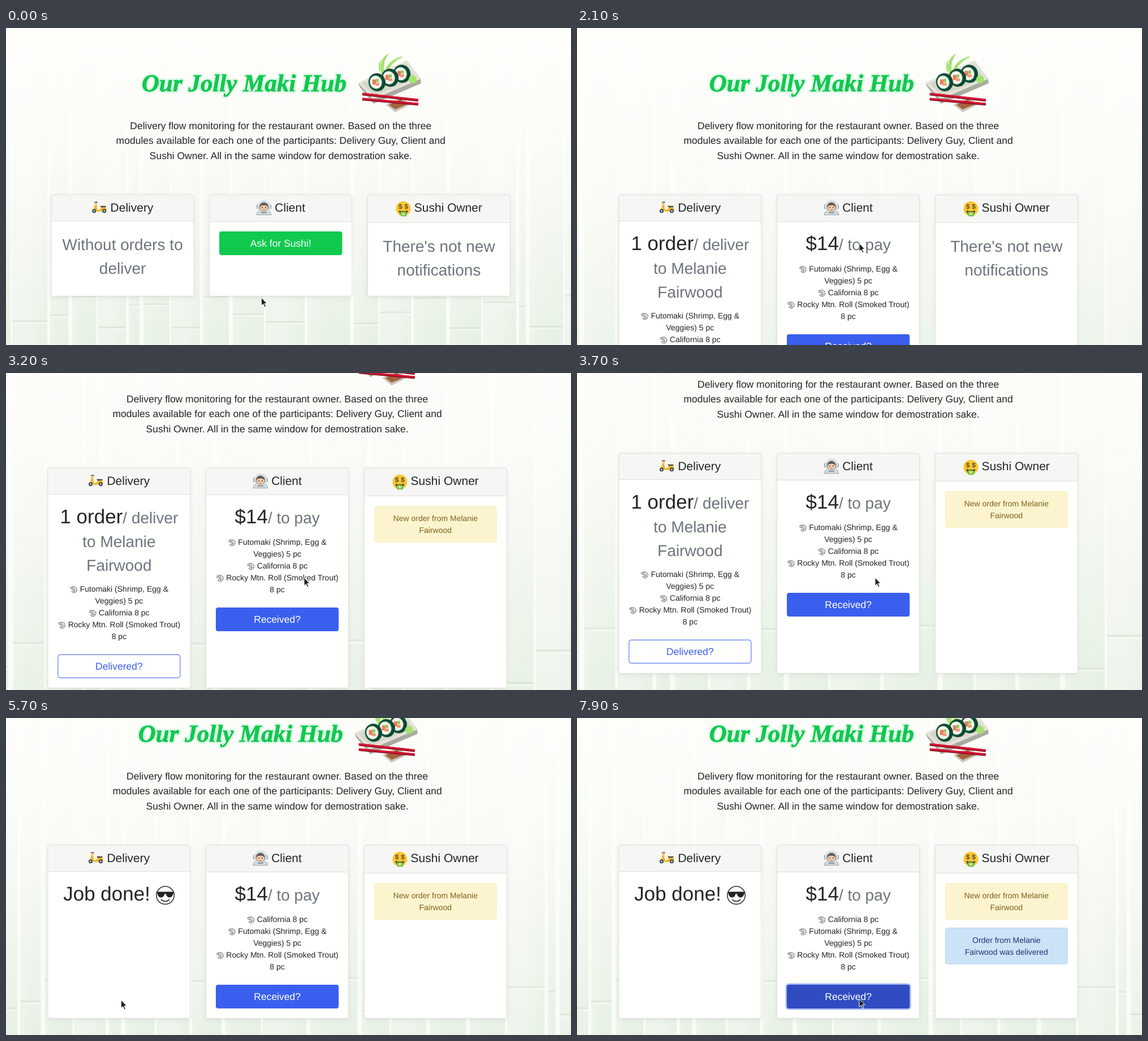
Write an HTML page with a canvas that moves like this. It is 999 by 561 pixels and loops after 8000 ms.

```html
<!DOCTYPE html>
<html lang="en">
<head>
<meta charset="utf-8">
<title>Sushi delivery</title>
<style>
  html, body { margin: 0; width: 100%; height: 100%; overflow: hidden; background: #fefefb; }
  canvas { display: block; }
</style>
</head>
<body>
<canvas id="stage" width="999" height="561"></canvas>
<script>
const ctx = document.getElementById('stage').getContext('2d');
ctx.textRendering = 'geometricPrecision';
const LOOP = 8000, STEP = 100, W = 999, H = 561;
const INK = '#212529', MUTED = '#6c757d', GREEN = '#10c94f', BLUE = '#3a5fee';
const SANS = '"Liberation Sans", Arial, sans-serif';
const CARD_LEFT = 79.6, CARD_PITCH = 279.7, CARD_WIDTH = 253;
const CUSTOMER = ['Melanie', 'Fairwood'];

// ---------- helpers ----------
const clamp = v => Math.max(0, Math.min(1, v));
const smooth = v => v * v * (3 - 2 * v);
const fade = (t, start) => clamp((t - start) / 200);

function track(t, keys, ease = v => v) {
  let [t0, v0] = keys[0];
  for (const [t1, v1] of keys) {
    if (t < t1) return v0 + (v1 - v0) * ease(clamp((t - t0) / (t1 - t0)));
    [t0, v0] = [t1, v1];
  }
  return v0;
}

function paint(d, fill, stroke, width = 1) {
  const path = new Path2D(d);
  if (fill) { ctx.fillStyle = fill; ctx.fill(path); }
  if (stroke) { ctx.strokeStyle = stroke; ctx.lineWidth = width; ctx.stroke(path); }
}

function disc(x, y, rx, fill, ry = rx, tilt = 0) {
  ctx.beginPath();
  ctx.ellipse(x, y, rx, ry, tilt, 0, 7);
  ctx.fillStyle = fill;
  ctx.fill();
}

function box(x, y, w, h, r, fill, stroke) {
  ctx.beginPath();
  ctx.roundRect(x, y, w, h, r);
  if (fill) { ctx.fillStyle = fill; ctx.fill(); }
  if (stroke) { ctx.strokeStyle = stroke; ctx.lineWidth = 1; ctx.stroke(); }
}

// Centres a run of [text or icon, size, colour] parts on one baseline.
function row(cx, y, ...parts) {
  const widths = parts.map(([item, size]) => {
    if (typeof item === 'function') return size;
    ctx.font = `${size}px ${SANS}`;
    return ctx.measureText(item).width;
  });
  let x = cx - widths.reduce((a, b) => a + b) / 2;
  parts.forEach(([item, size, color = INK], i) => {
    if (typeof item === 'function') {
      ctx.save();
      ctx.translate(x + size / 2, y - size * 0.27);
      ctx.scale(size / 27, size / 27);
      item();
      ctx.restore();
    } else {
      ctx.font = `${size}px ${SANS}`;
      ctx.fillStyle = color;
      ctx.fillText(item, x, y);
    }
    x += widths[i];
  });
}

// ---------- icons, drawn in a 27 unit square around the origin ----------
function scooter() {
  paint('M-9-9L-5-10L-4-8', null, '#4c565c', 1.6);
  paint('M-8-8L-5-8L-4 3Q0 5 2 2Q3-1 6-1H10Q13 1 13 5L5 7H-5L-10 3Z', '#f5b52e');
  paint('M1-3L11-3L12-1L3 0Z', '#5b4a42');
  disc(-8, -5, 1.6, '#ffe48c');
  for (const x of [-9.5, 8.5]) { disc(x, 6, 3.5, '#37474f'); disc(x, 6, 1.5, '#cfd8dc'); }
}

function astronaut() {
  paint('M-13 13Q-12 6-6 6L6 6Q12 6 13 13Z', '#d3dadd', '#98a4aa');
  box(-13, -6, 26, 9, 3, '#90a4ae');
  disc(0, -2, 11.5, '#dfe5e7');
  disc(0, -1, 8.6, '#78909c');
  disc(0, 0, 7, '#f3c9a8');
  paint('M-7-1Q-6-8 0-8Q6-8 7-1Q4-5 0-4Q-4-5-7-1Z', '#6d4c41');
  disc(-3, 0, 1, '#4b3730');
  disc(3, 0, 1, '#4b3730');
  paint('M-2 4Q0 5 2 4', null, '#a2583f');
  paint('M-5 9H5', null, '#7c8e98', 2);
}

function moneyFace() {
  disc(0, 2, 13, '#fbc72e');
  ctx.font = `bold 12px ${SANS}`;
  ctx.fillStyle = '#5d4634';
  ctx.fillText('$', -8.5, 2);
  ctx.fillText('$', 2, 2);
  paint('M-8 5Q0 8 8 5Q7 13 0 13Q-7 13-8 5Z', '#4e3b32');
  paint('M-5 8L5 8L5 15L-4 15Z', '#8cd45a', '#5dae40');
  disc(0, 11, 2, '#c7efa3');
}

function shrimp() {
  paint('M-12-5Q-6-12 3-10Q12-7 11 2Q9 11-1 11Q-8 10-6 5Q-2 7 2 4Q3 0-3-1Q-10 0-12-5Z',
    '#fff', '#555', 1.7);
  paint('M-5-10L-3-2M2-9L0-1M9-5L2 1M10 4L2 4M4 10L0 5M-11-9L-5-5', null, '#555', 1.5);
}

function coolFace() {
  paint('M-12.5 0A12.5 12.5 0 1 1 12.5 0A12.5 12.5 0 1 1-12.5 0Z', null, INK, 1.2);
  paint('M-12-5H12L11-2Q10 3 6 3Q2 3 1-2H-1Q-2 3-6 3Q-10 3-11-2Z', INK);
  paint('M-6 6Q0 11 6 6', null, INK, 1.3);
}

// ---------- scenery ----------
const STALKS = [-150, -85, -30, 10, 75, 112, 162, 214, 238, 291, 345, 396, 458, 530,
  610, 660, 718, 780, 842, 904, 921, 987, 1050, 1110];

function backdrop(pageHeight) {
  const k = pageHeight / H;
  ctx.save();
  ctx.translate((W - W * k) / 2, 0);
  ctx.scale(k, k);
  for (let i = 0; i < STALKS.length - 1; i++) {
    const x = STALKS[i], w = STALKS[i + 1] - x, joint = 500 + 30 * Math.sin(i * 2.3);
    const shade = ctx.createLinearGradient(x, 0, x + w, 0);
    shade.addColorStop(0, '#ebf3e8');
    shade.addColorStop(0.5, i % 3 ? '#e4efe2' : '#ebf3e9');
    shade.addColorStop(1, '#e2eee0');
    box(x, 0, w, H, 0, shade);
    box(x, joint, w, 3, 0, '#d3e1d1');
    box(x, joint + 3, w, 3, 0, '#eef5eb');
    box(x - 2, 0, 3 + i % 3 * 2, H, 0, '#f8fbf5');
  }
  const mist = ctx.createLinearGradient(0, 0, 0, H);
  [[0, 1], [0.3, 0.88], [0.5, 0.72], [0.72, 0.45], [1, 0.15]].forEach(([stop, alpha]) =>
    mist.addColorStop(stop, `rgba(254,254,251,${alpha})`));
  box(-300, 0, 1600, H, 0, mist);
  ctx.restore();
}

function heading() {
  const title = 'Our Jolly Maki Hub';
  ctx.font = 'italic bold 43px "Liberation Serif", Times, serif';
  ctx.textAlign = 'center';
  ctx.lineJoin = 'round';
  for (const [color, width] of [['#8fe3ab', 5], ['#fff', 4], [GREEN, 1]]) {
    ctx.strokeStyle = color;
    ctx.lineWidth = width;
    ctx.strokeText(title, 421, 112);
  }
  ctx.fillStyle = GREEN;
  ctx.fillText(title, 421, 112);
  ctx.textAlign = 'left';

  ['Delivery flow monitoring for the restaurant owner. Based on the three',
   'modules available for each one of the participants: Delivery Guy, Client and',
   'Sushi Owner. All in the same window for demostration sake.'
  ].forEach((line, i) => row(485.8, Math.round(179 + 26.25 * i), [line, 17.5]));
}

function sushiPlate() {
  paint('M672 136L697 122L716 135L688 149Z', '#c9c5b9');
  paint('M677 136L697 126L710 135L688 144Z', '#a5623e');
  paint('M622 97L626 105L650 134L734 98L733 89L648 122Z', '#a9aba0');
  paint('M622 97L709 57L734 90L649 126Z', '#e3e3d8');
  paint('M630 98L707 63L726 89L651 119Z', '#d5d6ca');
  paint('M665 82Q658 58 675 47Q664 62 669 81M670 80Q674 58 700 51Q678 62 674 80M662 78Q657 68 662 58',
    '#a5e36e', '#a5e36e', 1.5);
  for (const [x, y] of [[700, 81], [679, 88], [656, 96]]) {
    disc(x, y, 15, '#0d4631', 16, -0.3);
    disc(x - 2, y, 12, '#17684a', 13, -0.3);
    disc(x - 2, y, 10.5, '#f5f4e9', 11.5, -0.3);
    box(x - 8, y - 5, 6, 9, 1, '#f07a5d');
    box(x - 2, y - 6, 5, 6, 1, '#8bcf62');
    box(x - 3, y + 1, 7, 5, 1, '#ee9a79');
  }
  disc(719, 91, 7, '#a4e36c');
  paint('M630 126L729 135M630 117L729 128', null, '#8e0f24', 4.5);
  paint('M630 125L729 134M630 116L729 127', null, '#d81734', 3);
}

function card(x, height, headBottom, icon, label) {
  ctx.save();
  ctx.shadowColor = 'rgba(0,0,0,.06)';
  ctx.shadowBlur = 10;
  ctx.shadowOffsetY = 3;
  box(x, 295, CARD_WIDTH, height, 3.5, '#fffffd');
  ctx.restore();
  box(x, 295, CARD_WIDTH, headBottom - 295, [3.5, 3.5, 0, 0], '#f6f6f4');
  box(x, headBottom - 1, CARD_WIDTH, 1, 0, '#dedfdc');
  box(x + 0.5, 295, CARD_WIDTH - 1, height - 0.5, 3.5, null, '#dcdedb');
  row(x + CARD_WIDTH / 2, 325, [icon, 27], [' ' + label, 21]);
}

function button(cx, y, label, color, { fill = 1, dark = 0, ring = 0 } = {}) {
  const x = cx - 108.5;
  if (ring) {
    ctx.globalAlpha = ring;
    box(x - 2.5, y - 2.5, 222, 47, 6, color === BLUE ? '#a9bbf6' : '#9be8b6');
    ctx.globalAlpha = 1;
  }
  box(x + 0.5, y + 0.5, 216, 41, 4, '#fffffd', color);
  ctx.globalAlpha = fill;
  box(x, y, 217, 42, 4, color);
  ctx.globalAlpha = dark;
  box(x, y, 217, 42, 4, '#000');
  ctx.globalAlpha = 1;
  row(cx, y + 27, [label, 17.5, fill > 0.5 ? '#fff' : color]);
}

function alertBox(cx, y, lines, bg, border, ink) {
  box(cx - 108, y + 0.5, 216, 64, 3.5, bg, border);
  lines.forEach((line, i) => row(cx, y + 27 + 21 * i, [line, 14, ink]));
}

const FUTOMAKI = ['* Futomaki (Shrimp, Egg &', 'Veggies) 5 pc'];
const CALIFORNIA = ['* California 8 pc'];
const ROCKY = ['* Rocky Mtn. Roll (Smoked Trout)', '8 pc'];

function orderList(cx, y, lines) {
  lines.forEach((line, i) => {
    const parts = line[0] === '*' ? [[shrimp, 14], [line.slice(1), 14]] : [[line, 14]];
    row(cx, y + 21 * i, ...parts);
  });
}

function pointer(x, y) {
  ctx.save();
  ctx.translate(x, y);
  paint('M0 0V14.5L3.3 11.5L5.7 17L8 16L5.6 10.6H10Z', '#222', '#fff', 1);
  ctx.restore();
}

// ---------- the three modules ----------
function deliveryCard(t, x, height, ordered, done) {
  const cx = x + CARD_WIDTH / 2;
  card(x, height, 342, scooter, 'Delivery');
  if (done) {
    row(cx, 393, ['Job done! ', 35], [coolFace, 34]);
  } else if (ordered) {
    row(cx, 393, ['1 order', 35], ['/ deliver', 28, MUTED]);
    row(cx, 435, ['to ' + CUSTOMER[0], 28, MUTED]);
    row(cx, 477, [CUSTOMER[1], 28, MUTED]);
    orderList(cx, 514, [...FUTOMAKI, ...CALIFORNIA, ...ROCKY]);
    button(cx, 625, 'Delivered?', BLUE, { fill: fade(t, 4350), ring: fade(t, 4950) });
  } else {
    row(cx, 393, ['Without orders to', 28, MUTED]);
    row(cx, 435, ['deliver', 28, MUTED]);
  }
}

function clientCard(t, x, height, ordered, done) {
  const cx = x + CARD_WIDTH / 2;
  card(x, height, 343, astronaut, 'Client');
  if (!ordered) {
    button(cx, 360, 'Ask for Sushi!', GREEN, { dark: 0.13 * fade(t, 700), ring: fade(t, 1350) });
    return;
  }
  row(cx, 393, ['$14', 35], ['/ to pay', 28, MUTED]);
  orderList(cx, 431, done ? [...CALIFORNIA, ...FUTOMAKI, ...ROCKY]
                          : [...FUTOMAKI, ...CALIFORNIA, ...ROCKY]);
  button(cx, 542, 'Received?', BLUE,
    { dark: 0.12 * fade(t, 7100) + 0.07 * fade(t, 7600), ring: fade(t, 7600) });
}

function ownerCard(t, x, height) {
  const cx = x + CARD_WIDTH / 2, [first, last] = CUSTOMER;
  card(x, height, 345, moneyFace, 'Sushi Owner');
  if (t < 2200) {
    row(cx, 396, ["There's not new", 28, MUTED]);
    row(cx, 438, ['notifications', 28, MUTED]);
    return;
  }
  alertBox(cx, 362, ['New order from ' + first, last], '#fbf4cf', '#faf0c4', '#806018');
  if (t >= 5900) {
    alertBox(cx, 441, ['Order from ' + first, last + ' was delivered'], '#cbe2f7', '#b9d6f2', '#1f3570');
  }
}

function render(now) {
  const t = Math.floor(now % LOOP / STEP) * STEP;
  const ordered = t >= 1900, done = t >= 5700;
  const height = done ? 307 : ordered ? 390 : 180;
  const scroll = Math.round(track(t, [[2300, 0], [2900, 89], [3400, 153], [5600, 153], [5700, 70]]));

  ctx.fillStyle = '#fefefb';
  ctx.fillRect(0, 0, W, H);
  ctx.save();
  ctx.translate(0, -scroll);
  backdrop(324 + height + 57 * !ordered);
  // The scrollbar of the taller page moves the centred column left.
  ctx.translate(ordered ? -6.2 : 0, 0);
  heading();
  sushiPlate();
  deliveryCard(t, CARD_LEFT, height, t >= 2100, done);
  clientCard(t, CARD_LEFT + CARD_PITCH, height, ordered, done);
  ownerCard(t, CARD_LEFT + 2 * CARD_PITCH, height);
  ctx.restore();

  pointer(
    track(t, [[100, 451.5], [1000, 499], [2100, 499], [2400, 527], [3700, 527], [4500, 203.5], [6900, 203.5], [7400, 499]], smooth),
    track(t, [[100, 477], [1000, 381], [2100, 381], [2400, 362], [3700, 362], [4500, 499], [6900, 499], [7400, 497]], smooth)
  );
}

function tick() {
  render(performance.now());
  requestAnimationFrame(tick);
}
tick();
</script>
</body>
</html>
```
